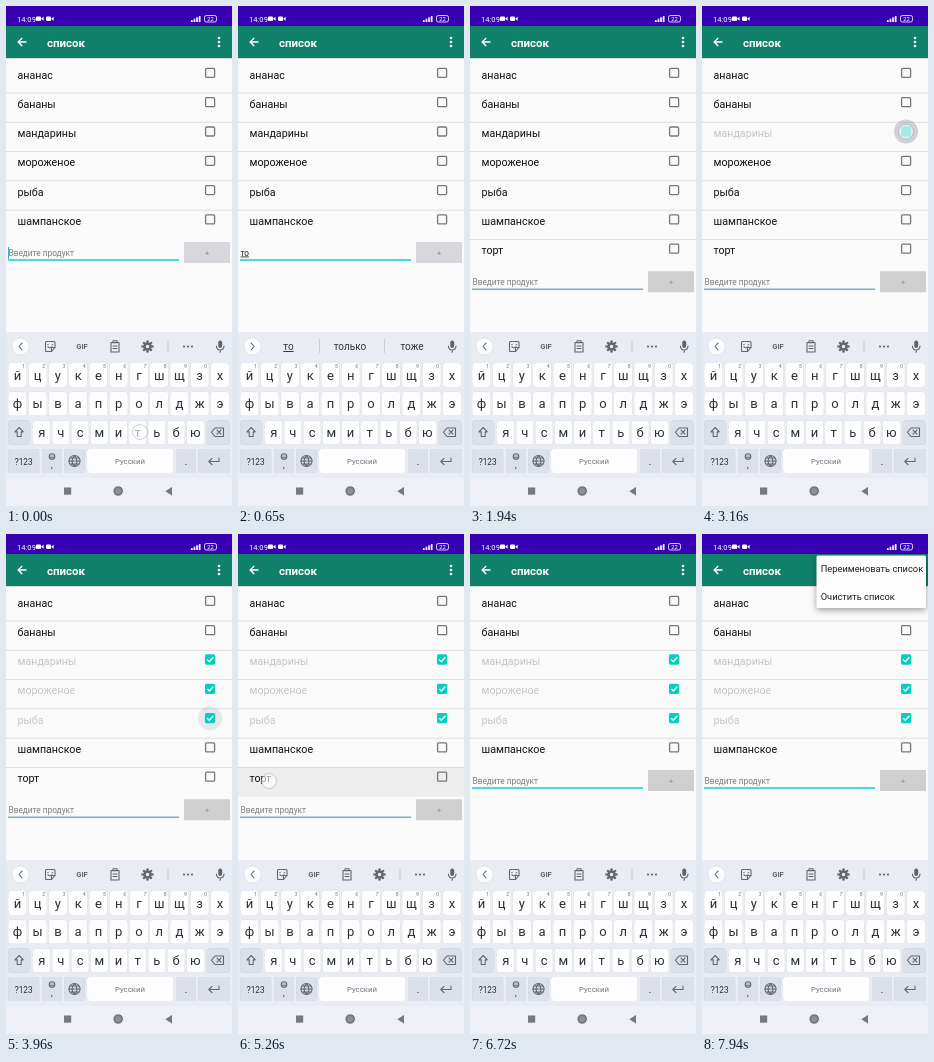
These frames come from a looping animation (226x500 px, 8000 ms). An HTML page:

```html
<!DOCTYPE html>
<html lang="ru">
<head>
<meta charset="utf-8">
<title>Список покупок</title>
<style>
  html, body { margin: 0; width: 100%; height: 100%; overflow: hidden; background: #fafafa; }
  svg { display: block; width: 226px; height: 500px; font-family: Roboto, "Noto Sans", sans-serif; }
  .line { fill: none; stroke: #62666c; stroke-width: 1.1; stroke-linecap: round; stroke-linejoin: round; }
  .key { fill: #fdfdfe; filter: drop-shadow(0 .7px .4px #b4b9c2); }
  .key.dim { fill: #dce1e9; }
  .menu rect { fill: #fdfdfd; filter: drop-shadow(0 2px 3px rgba(0, 0, 0, .38)); }
  .touch { fill: rgba(255, 255, 255, .62); stroke: rgba(110, 115, 125, .4); stroke-width: .8; }
</style>
</head>
<body>
<svg id="stage" viewBox="0 0 226 500"></svg>
<script>
const LOOP = 8000, PITCH = 29.3;
const ITEMS = ['ананас', 'бананы', 'мандарины', 'мороженое', 'рыба', 'шампанское', 'торт'];
const CHECKS = { 2: 3100, 3: 3460, 4: 3800 };
const ADDED = 1540, REMOVED = 6390;
const TYPING = [[410, 'т'], [570, 'то'], [730, 'тор'], [970, 'торт']];
const GUESSES = { 'т': ['то', 'так'], 'то': ['только', 'тоже'], 'тор': ['торт', 'торг'], 'торт': ['торты', 'тортик'] };
const CARET = [[0, 410], [1540, 1940], [2430, 2840], [4360, 4690], [6390, 6720], [7170, 7620]];
// x, y, down, up
const TOUCHES = [
  [134, 426, 0, 410], [133, 398, 490, 600], [113, 398, 660, 770], [133, 426, 840, 970],
  [205, 247, 1380, 1540], [31, 247, 4850, 5600], [53, 287, 6070, 6250], [213, 36, 7620, 7800],
  ...Object.entries(CHECKS).map(([i, at]) => [204, 67 + i * PITCH, at - 100, at + 80])
];

const text = (x, y, s, size, fill = '#111', more = '') =>
  `<text x="${x}" y="${y}" font-size="${size}" fill="${fill}" ${more}>${s}</text>`;
const mid = (x, y, s, size, fill, more = '') => text(x, y, s, size, fill, `text-anchor="middle" ${more}`);
const rect = (x, y, w, h, fill, more = '') =>
  `<rect x="${x}" y="${y}" width="${w}" height="${h}" fill="${fill}" ${more}/>`;
const circle = (x, y, r, more) => `<circle cx="${x}" cy="${y}" r="${r}" ${more}/>`;
const path = (d, more = 'class="line"') => `<path d="${d}" ${more}/>`;
const key = (x, y, w, dim = '') => `<rect class="key ${dim}" x="${x}" y="${y}" width="${w}" height="24" rx="3"/>`;
const dots = (pts, fill, r) => pts.map(([x, y]) => circle(x, y, r, `fill="${fill}"`)).join('');

function header() {
  const camera = x => rect(x, 10.5, 5, 4.6, '#fff', 'rx="1"') + path(`M${x + 5} 12.8l2.6-2v4z`, 'fill="#fff"');
  const bars = [0, 1, 2, 3].map(i => rect(185 + i * 2.6, 14.2 - i * 1.4, 1.7, 1.8 + i * 1.4, '#fff')).join('');
  return rect(0, 0, 226, 20, '#3700b3') + rect(0, 20, 226, 32, '#118068') + rect(0, 52, 226, 1, '#d9dedd') +
    text(11, 15.8, '14:09', 7.6, '#fff') + camera(30) + camera(40) + bars +
    rect(198.5, 9.5, 12, 6.5, 'none', 'rx="1.8" stroke="#fff" stroke-width=".8"') +
    mid(204.5, 15, '22', 5.6, '#fff') +
    path('M20.5 36H12.5M16.2 32l-4 4 4 4', 'fill="none" stroke="#fff" stroke-width="1.4"') +
    text(41, 40.5, 'список', 11.5, '#fff', 'font-weight="600"') +
    dots([[213, 32], [213, 36], [213, 40]], '#fff', 1.3);
}

function list() {
  return ITEMS.map((name, i) => {
    const dy = i * PITCH;
    return `<g id="row${i}" transform="translate(0 ${dy})">` +
      (i ? rect(0, 57.2, 226, .9, '#dadbdc') : '') +
      (i === 6 ? rect(0, 58, 226, 29, '#000', 'id="press" opacity="0"') : '') +
      `<circle id="ripple${i}" cx="204" cy="67" r="12" fill="#8e9aa8" opacity="0"/>` +
      text(11.5, 72.5, name, 10.7, '#111', `id="name${i}"`) +
      `<rect id="box${i}" x="199.6" y="62.4" width="9" height="9" rx="1" stroke-width="1.3"/>` +
      `<path id="tick${i}" d="M201.2 67l2.1 2.2 4-4.6" fill="none" stroke="#fff" stroke-width="1.3" pathLength="1" stroke-dasharray="1 2"/></g>`;
  }).join('');
}

function entry() {
  return '<g id="entry">' +
    text(2.5, 250, 'Введите продукт', 8.3, '#7d7f82', 'id="hint"') +
    text(2.5, 249.5, '', 8.2, '#222', 'id="typed" text-decoration="underline"') +
    rect(2, 241, 1, 12, '#2fb9c4', 'id="caret"') + rect(2, 253.2, 171, 1.6, '#22d0da', 'id="under"') +
    rect(178, 236, 46, 21, '#d7d7dc', 'id="add"') + mid(201, 249.5, '+', 8, '#8b8b8f') +
    rect(178, 236, 46, 21, '#000', 'id="addPress" opacity="0"') + '</g>';
}

function strip() {
  const gear = [0, 1, 2, 3, 4, 5, 6, 7].map(i =>
    rect(140.4, 334.4, 2.2, 3, '#62666c', `transform="rotate(${i * 45} 141.5 340.5)"`)).join('');
  const tools = '<g id="tools">' +
    path('M40.5 335.5h7.5q1 0 1 1v5l-3.5 4h-5q-1 0-1-1v-8q0-1 1-1zM45.5 345v-3.5h3.5M42 338.3v.3M46.3 338.3v.3M42 340.8q2 2 4 0') +
    mid(76, 343.2, 'GIF', 7.6, '#62666c', 'font-weight="700"') +
    path('M105 336.5h8v9.5h-8zM107 334.8h4v2h-4zM107 340h4M107 342.5h4') + gear +
    circle(141.5, 340.5, 3, 'fill="none" stroke="#62666c" stroke-width="2.4"') +
    rect(161.5, 334, 1, 13, '#c4c8cf') + dots([[178, 340.5], [182, 340.5], [186, 340.5]], '#62666c', 1.1) +
    path('M16 337.2l-3 3.3 3 3.3') + '</g>';
  const words = '<g id="words">' + [50.5, 112, 174].map((x, i) =>
    mid(x, 344, '', 10, '#33363a', `id="word${i}" ${i ? '' : 'text-decoration="underline"'}`)).join('') +
    rect(81, 333, .8, 14, '#c4c8cf') + rect(146, 333, .8, 14, '#c4c8cf') + path('M13.2 337.2l3 3.3-3 3.3') + '</g>';
  return circle(14.5, 340.5, 8.6, 'fill="#fbfcfd" stroke="#d8dce2" stroke-width=".6"') + tools + words +
    rect(212.2, 334.5, 4, 7.6, '#62666c', 'rx="2"') + path('M210.4 340q.3 4 3.8 4t3.8-4M214.2 344v2.2');
}

function keyboard() {
  let s = rect(0, 326, 226, 146, '#e9ecf2') + rect(0, 472, 226, 28, '#eff1f6') + strip();
  const ink = '#2c2f33';
  [...'йцукенгшщзх'].forEach((c, i) => {
    const x = 2.2 + i * 20.25;
    s += key(x, 357, 18.4) + mid(x + 9.2, 373.5, c, 13, ink) + mid(x + 15.2, 362.3, i < 10 ? (i + 1) % 10 : '', 5.2, '#777');
  });
  [...'фывапролджэ'].forEach((c, i) => {
    const x = 2.2 + i * 20.25;
    s += key(x, 385.7, 18.4) + mid(x + 9.2, 402, c, 13, ink);
  });
  [...'ячсмитьбю'].forEach((c, i) => {
    const x = 27 + i * 19.2;
    s += key(x, 414.4, 17.4) + mid(x + 8.7, 430.5, c, 13, ink);
  });
  s += key(2.2, 414.4, 22, 'dim') + path('M13.2 421.5l4.2 4.4h-2.2v4.6h-4v-4.6H9z') +
    key(200.8, 414.4, 23, 'dim') + path('M209 422h8.5v8.5H209l-3.6-4.25zM211 424.2l4 4M215 424.2l-4 4');
  s += key(2.2, 443, 31, 'dim') + mid(17.7, 458.5, '?123', 8.3, ink) +
    key(36, 443, 20, 'dim') + circle(46, 450.5, 2.8, 'class="line"') + path('M45 449.8v.1M47 449.8v.1M44.8 451.4q1.2 1 2.4 0') +
    mid(46, 462, ',', 9, ink) +
    key(58.5, 443, 20, 'dim') + circle(68.5, 455, 5.5, 'class="line"') + path('M63 455h11M64 452h9M64 458h9M68.5 449.5q-5 5.5 0 11q5-5.5 0-11') +
    key(81, 443, 86.5) + mid(124, 458, 'Русский', 7.8, '#74777c') +
    key(170, 443, 20, 'dim') + mid(180, 459, '.', 11, ink) +
    key(192.5, 443, 31.5, 'dim') + path('M213 452v3.5h-10M206 452.3l-3.2 3.2 3.2 3.2');
  return s + rect(58, 481.5, 7.2, 7.2, '#777a80') + circle(112.2, 485, 4, 'fill="#8b8e94" stroke="#74777c" stroke-width="1.6"') +
    path('M166 481v8.4l-6.8-4.2z', 'fill="#777a80"');
}

const menu = (id, x, y, w, h, tx, labels) => `<g id="${id}" class="menu">` + rect(x, y, w, h, '#fff', 'rx="1.5"') +
  labels.map((s, i) => text(tx, y + 16.8 + i * 27.3, s, 9.3, '#1c1c1c')).join('') + '</g>';

document.getElementById('stage').innerHTML = rect(0, 0, 226, 500, '#fafafa') + header() + list() + entry() + keyboard() +
  menu('itemMenu', 31, 247.5, 113, 55, 40, ['Переименовать', 'Удалить']) +
  menu('listMenu', 114.5, 21.5, 109.5, 52.5, 118.7, ['Переименовать список', 'Очистить список']) +
  circle(0, 0, 7.5, 'id="touch" class="touch"');

const $ = id => document.getElementById(id);
const set = (id, attrs) => { for (const k in attrs) $(id).setAttribute(k, attrs[k]); };
const show = (id, on) => set(id, { visibility: on ? 'visible' : 'hidden' });
const within = (t, a, b) => t >= a && t < b;
const ramp = (t, a, b) => Math.min(1, Math.max(0, (t - a) / (b - a)));
const ease = p => 1 - (1 - p) ** 2;

function popMenu(id, x, y, grow, fade) {
  const s = .55 + .45 * ease(grow);
  set(id, { opacity: grow * (1 - fade), transform: `translate(${x} ${y}) scale(${s}) translate(${-x} ${-y})` });
  show(id, grow > 0 && fade < 1);
}

function draw(t) {
  const seven = within(t, ADDED, REMOVED);
  show('row6', seven);
  ITEMS.forEach((_, i) => {
    const at = CHECKS[i] ?? Infinity, done = t >= at;
    set('name' + i, { fill: done ? '#c3c7cd' : '#111' });
    set('box' + i, { fill: done ? '#08cfbd' : 'none', stroke: done ? '#08cfbd' : '#74777b' });
    set('tick' + i, { 'stroke-dashoffset': 1 - ramp(t, at + 70, at + 150) });
    show('tick' + i, t > at + 70);
    set('ripple' + i, { opacity: isFinite(at) ? .42 * ramp(t, at - 50, at + 20) * (1 - ramp(t, at + 60, at + 240)) : 0 });
  });
  set('press', { opacity: .07 * ramp(t, 4900, 5380) * (1 - ramp(t, 5560, 5740)) });

  const typed = t < ADDED ? TYPING.filter(([at]) => t >= at).map(([, s]) => s).pop() || '' : '';
  set('entry', { transform: `translate(0 ${seven ? PITCH : 0})` });
  $('typed').textContent = typed;
  show('hint', !typed);
  show('caret', CARET.some(([a, b]) => within(t, a, b)));
  set('under', { fill: seven ? '#83aebb' : '#22d0da' });
  set('add', { fill: t < 1380 ? '#d7d7dc' : '#cfcfd0' });
  set('addPress', { opacity: within(t, 1380, 1700) ? .05 * (1 - ramp(t, 1540, 1700)) : 0 });

  show('tools', !typed);
  show('words', typed);
  [typed, ...(GUESSES[typed] || ['', ''])].forEach((s, i) => { $('word' + i).textContent = s; });

  popMenu('itemMenu', 31, 247.5, ramp(t, 5360, 5560), ramp(t, 6230, 6390));
  popMenu('listMenu', 224, 21.5, ramp(t, 7700, 7900), 0);

  const hit = TOUCHES.find(([, , a, b]) => within(t, a, b));
  show('touch', hit);
  if (hit) set('touch', { cx: hit[0], cy: hit[1] });
}

const start = performance.now();
function tick() {
  draw((performance.now() - start) % LOOP);
  requestAnimationFrame(tick);
}
tick();
</script>
</body>
</html>
```
